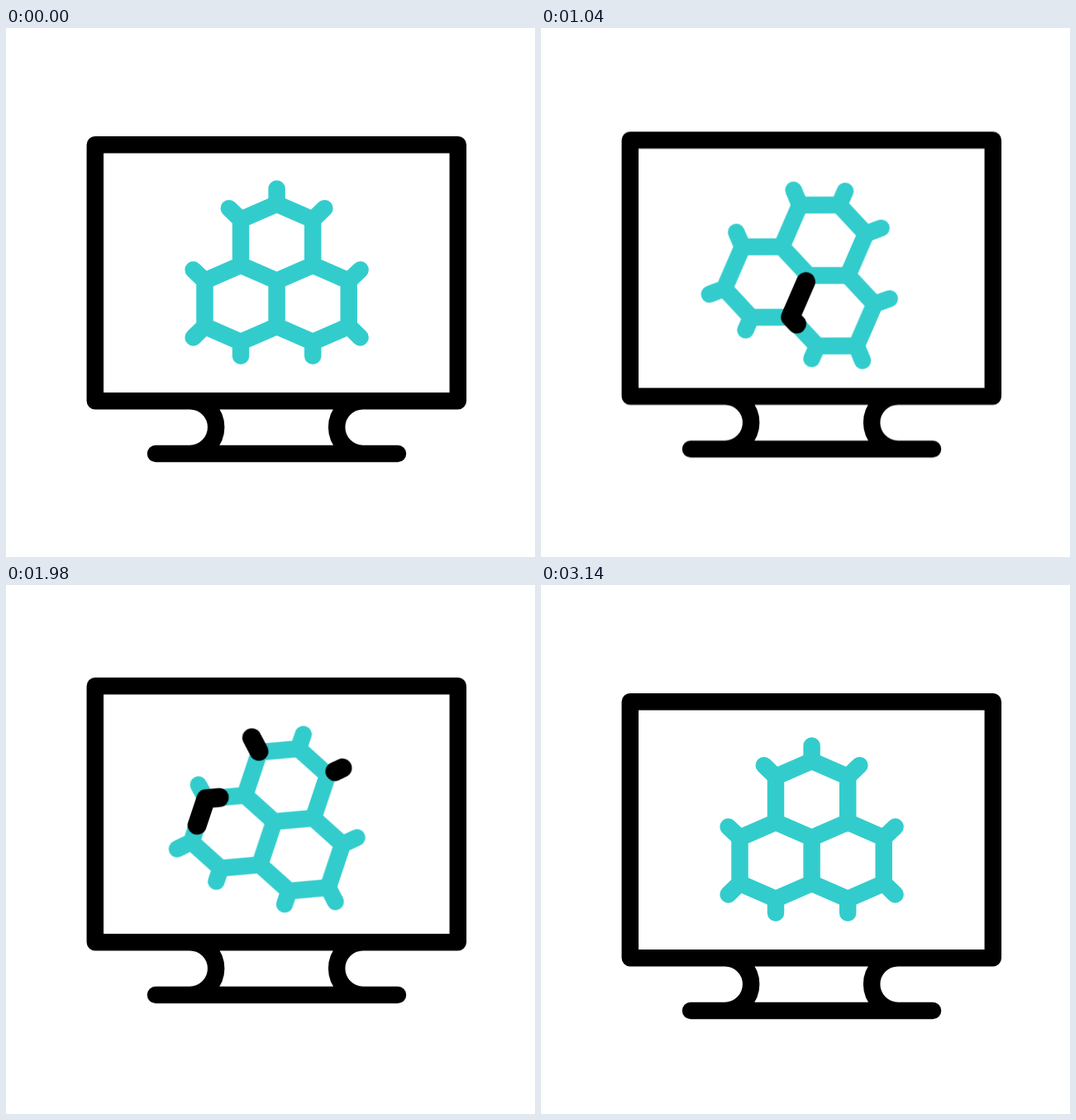
Write an HTML page that moves like this. It is 640 by 640 pixels and loops after 3420 ms.

```html
<!DOCTYPE html>
<html lang="en">
<head>
<meta charset="utf-8">
<title>Molecule on a monitor</title>
<style>
  html, body { margin: 0; width: 100%; height: 100%; overflow: hidden; background: #fff; }
  svg { display: block; width: 100vw; height: 100vh; }
  path { fill: none; stroke-width: 20.48; stroke-linecap: round; stroke-linejoin: round; }
  .frame { stroke: #000; }
  .bonds { stroke: #33cccc; }
  .runner { stroke: #000; stroke-width: 23.04; opacity: 0; }
  .dot { fill: #33cccc; opacity: 0; }

  .bob { animation: bob 3420ms cubic-bezier(.333, 0, .667, 1) infinite; }
  .turn { transform-origin: 327.6px 296px; animation: turn 3420ms infinite; }

  @keyframes bob {
    0%, 5.848% { transform: translateY(0); }
    23.392% { transform: translateY(-19.2px); }
    40.936% { transform: translateY(19.2px); }
    58.48% { transform: translateY(-19.2px); }
    76.023%, 100% { transform: translateY(0); }
  }
  @keyframes turn {
    0% { transform: rotate(0deg); }
    5.848% { transform: rotate(0deg); animation-timing-function: cubic-bezier(.25, 0, .23, 1); }
    40.936% { transform: rotate(25deg); animation-timing-function: cubic-bezier(.667, 0, .667, 1); }
    76.023%, 100% { transform: rotate(0deg); }
  }
</style>
</head>
<body>
<svg viewBox="0 0 640 640">
  <g class="bob">
    <path class="frame" d="M107.8 141.2H546.8V451.2H107.8Z M181 514.9H474
      M222.3 451.2a31.85 31.85 0 0 1 0 63.7 M432 451.2a31.85 31.85 0 0 0 0 63.7"/>
    <g class="turn" id="molecule"></g>
  </g>
</svg>
<script>
  const LOOP = 3420;
  const molecule = document.getElementById('molecule');

  // Right half of the molecule; a trailing "-" on a name mirrors the point.
  const AXIS = 327.6;
  const points = {
    A: [327.6, 212.8], B: [371.2, 231.8], C: [371.2, 286.8], O: [327.6, 305.8],
    D: [414.7, 305.8], E: [414.7, 360.8], F: [371.2, 379.8], G: [327.6, 360.8],
    a: [327.6, 194.6], b: [385.4, 218.2], d: [428.6, 292.6], e: [428.6, 374.4],
    f: [371.2, 396.8], tip: [371.2, 400.2]
  };

  function point(name) {
    const [x, y] = points[name.replace('-', '')];
    return name.endsWith('-') ? [2 * AXIS - x, y] : [x, y];
  }

  const line = names => 'M' + names.split(' ').map(n => point(n).join(' ')).join('L');

  function add(tag, attrs) {
    const el = document.createElementNS('http://www.w3.org/2000/svg', tag);
    for (const key in attrs) el.setAttribute(key, attrs[key]);
    return molecule.appendChild(el);
  }

  const loop = (el, frames) => el.animate(frames, { duration: LOOP, iterations: Infinity });

  const hexes = ['A B C O C- B-', 'C D E F G O', 'C- D- E- F- G O'];
  const stubs = ['A a', 'B b', 'B- b-', 'D d', 'D- d-', 'E e', 'E- e-', 'F f', 'F- f-'];
  add('path', {
    class: 'bonds',
    d: hexes.map(h => line(h) + 'Z').join('') + stubs.map(line).join('')
  });

  // A black piece runs along a route: times in ms, each with tail and head distance.
  function runner(route, start, end, ...keys) {
    const el = add('path', { class: 'runner', d: line(route) });
    const total = el.getTotalLength();
    const key = (time, tail, head, opacity) => ({
      offset: time / LOOP, opacity,
      strokeDasharray: `${head - tail}px 999px`,
      strokeDashoffset: `${-tail}px`
    });
    loop(el, [
      key(0, 0, 0, 0), key(start, 0, 0, 0), key(start, 0, 0, 1),
      ...keys.map(([time, tail, head]) => key(time, tail, head, 1)),
      key(end, total, total, 1), key(end, total, total, 0), key(LOOP, total, total, 0)
    ]);
  }

  runner('C O G F', 210, 1470, [740, 23, 81], [1300, 84, 142]);
  runner('e- E- F- f-', 1110, 1590, [1300, 0, 28]);
  runner('B- C- O', 1310, 1930, [1620, 0, 103]);
  runner('C- D- E-', 1640, 2310, [1980, 31, 81]);
  runner('b- B-', 1800, 2160, [1980, 0, 18.5]);
  runner('b B', 1880, 2220, [1980, 0, 10]);
  runner('C D E', 2240, 2900, [2580, 31, 83]);
  runner('e E F tip', 2690, 3130, [2900, 6, 52]);

  const [cx, cy] = point('C');
  const dot = add('circle', { class: 'dot', cx, cy, r: 11.52 });
  loop(dot, [
    { offset: 0, opacity: 0 }, { offset: 3130 / LOOP, opacity: 0 },
    { offset: 3130 / LOOP, opacity: 1 }, { offset: 1, opacity: 1 }
  ]);
</script>
</body>
</html>
```
